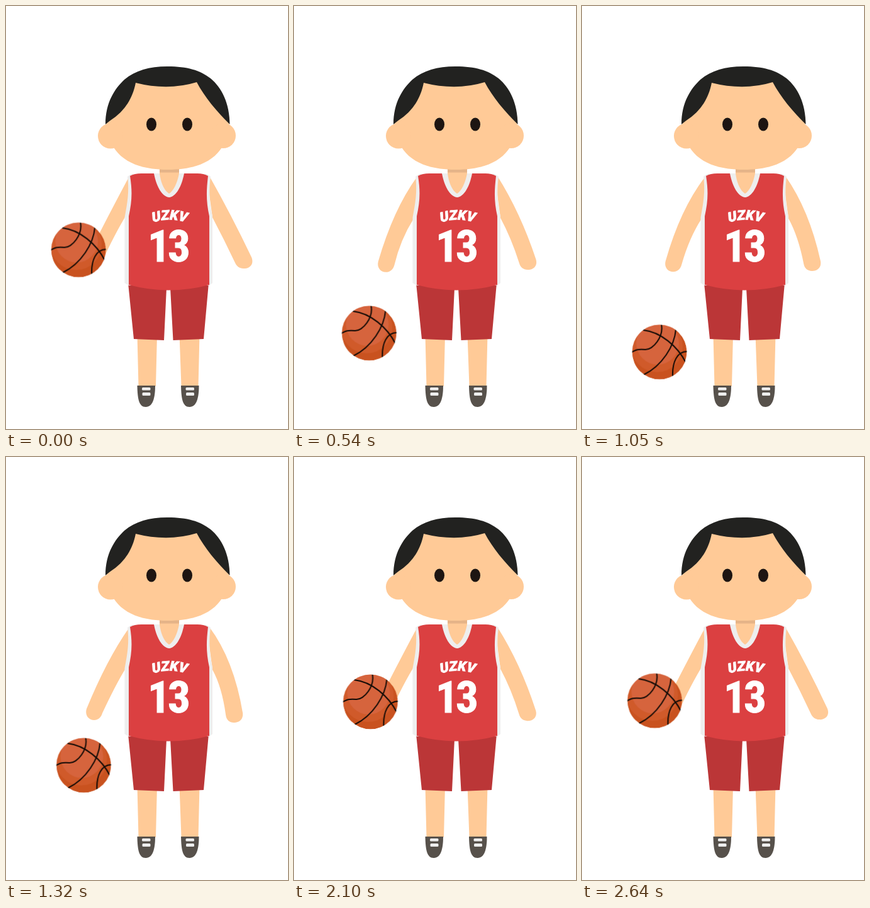
Animation, 448 px wide and 672 px high, one loop 2.67 s. Source, as an HTML page:

```html
<!DOCTYPE html>
<html lang="en">
<head>
<meta charset="utf-8">
<title>Dribbling player</title>
<style>
  html, body { margin: 0; width: 100%; height: 100%; overflow: hidden; background: #fff; }
  svg { display: block; width: 448px; height: 672px; }
  .skin { fill: #ffca97; }
  .trim { fill: #eee; }
  .shirt { fill: #db4041; }
  .shorts { fill: #bb3637; }
  .dark { fill: #1d1512; }
  .print { fill: #fff; stroke: #fff; text-anchor: middle; }
  .team { font: italic 900 21.5px Roboto, "Liberation Sans", sans-serif; stroke-width: .8; }
  .number { font: 700 71px "Roboto Condensed", Roboto, "Liberation Sans", sans-serif; stroke-width: 1; }
  .seams { fill: none; stroke: #110a06; stroke-width: 2; }
  .ball, .arm { animation: 2670ms linear infinite; }
  .ball { animation-name: bounce; }
  .left { animation-name: dribble; }
  .right { animation-name: swing; }

  @keyframes bounce {
    0%, 100% { transform: translate(115.2px, 387.2px); }
    11.24% { transform: translate(117.5px, 461px); }
    30.34% { transform: translate(121.5px, 585.5px); }
    31.84% { transform: translate(121.8px, 593px); }
    41.57% { transform: translate(123.5px, 537px); }
    49.44% { transform: translate(123.5px, 490px); }
    64.04% { transform: translate(122.5px, 406.5px); }
    66.7% { transform: translate(122.4px, 394px); }
    78.65% { transform: translate(121.5px, 389px); }
  }
  @keyframes dribble {
    0%, 78.65%, 100% { d: path("M195 272Q163 332 129 399C126 409 132 417 141 417C147 417 151 412 153 405Q173 362 190 334L195 300Z"); }
    11.24% { d: path("M195 272Q163 322 131 402C128 412 134 420 143 420C149 420 154 416 156 410Q170 370 190 336L195 300Z"); }
    30.34% { d: path("M195 272Q152 325 137 410C135 419 141 426 149 426C156 426 161 422 163 414Q168 372 190 340L195 300Z"); }
    49.44%, 64.04% { d: path("M195 272Q160 322 128 400C125 410 131 418 140 418C146 418 151 414 153 407Q174 362 190 336L195 300Z"); }
  }
  @keyframes swing {
    0%, 100% { d: path("M323 270Q358 332 390 399C395 411 386 418 377 417C371 417 366 413 364 408Q347 372 328 336L323 300Z"); }
    50% { d: path("M323 270Q362 322 376 407C377 417 370 422 362 422C355 422 350 418 349 410Q343 365 328 338L323 300Z"); }
  }
</style>
</head>
<body>
<svg viewBox="0 0 448 672">
  <defs>
    <path id="arch" d="M227 346Q260 333 293 346"/>
    <clipPath id="round"><circle r="43.5"/></clipPath>
    <g id="shoe">
      <path fill="#57514b" d="M208.500 603H237C237 623 233 637 222 637S209 624 208.500 603Z"/>
      <rect class="trim" x="216" y="606" width="13.500" height="4.500" rx="1.500"/>
      <rect class="trim" x="216.500" y="614" width="13" height="5" rx="1.500"/>
    </g>
  </defs>

  <path class="skin" d="M208.500 522H240L238 604H210.500ZM275.500 522H307.500L305.500 604H278.500Z"/>
  <use href="#shoe"/>
  <use href="#shoe" x="69.500"/>
  <path class="shorts" d="M194 440L203 529L251 531L255 448ZM261 448L265.500 531L314 529L322 440Z"/>

  <path class="skin arm left" d="M195 272Q163 332 129 399C126 409 132 417 141 417C147 417 151 412 153 405Q173 362 190 334L195 300Z"/>
  <path class="skin arm right" d="M323 270Q358 332 390 399C395 411 386 418 377 417C371 417 366 413 364 408Q347 372 328 336L323 300Z"/>

  <path class="trim" d="M193 271L199 267H319L325 271C322 295 323 312 328 334V440L323 444H195L188.500 440V336C193 312 196 295 193 271Z"/>
  <path class="shirt" d="M197 270Q204 266 215 266H304Q314 266 321 270C318 295 318 311 323 334V443Q259 460 195 443V334C200 311 201 295 197 270Z"/>
  <path class="trim" d="M235 266C239 287 248 303 259 304C270 303 279 287 283 266Z"/>
  <path class="skin" d="M244 255H275V266C272 282 266 294 259 298C252 294 246 282 244 266Z"/>
  <rect x="244" y="257" width="31" height="7.500" fill="#e5b488"/>

  <path class="skin" d="M159 177C159 232 192 260 257 260S355 232 355 177L303 110H206Z"/>
  <circle class="skin" cx="166" cy="206.500" r="20"/>
  <circle class="skin" cx="345" cy="206" r="20"/>
  <path fill="#222220" d="M158 188C158 153 173 131 188 117C206 102 228 96 257 96C288 96 308 102 325 115C343 130 355 154 355.500 188C335 168 315 144 303 121Q257 135 206 122C201 148 188 165 174 176Q165 182 158 188Z"/>
  <ellipse class="dark" cx="231" cy="188" rx="8" ry="10.500"/>
  <ellipse class="dark" cx="288" cy="188" rx="8" ry="10.500"/>

  <text class="print team"><textPath href="#arch" startOffset="50%">UZKV</textPath></text>
  <text class="print number" x="243" y="406">1</text>
  <text class="print number" x="275" y="406">3</text>

  <g class="ball">
    <g clip-path="url(#round)">
      <circle r="43.500" fill="#c9521f"/>
      <circle cx="-4" cy="-9" r="41" fill="#d05a2a"/>
      <circle cx="-3" cy="-14" r="34" fill="#d6643d"/>
      <path class="seams" d="M-26-35C2-32 29-9 42 17M3-44C7-25-10-3-23-4S-38-3-44 0M26-36C24-10 4 22-25 36M44-1C28-1 20 16 21 39"/>
    </g>
  </g>
</svg>
</body>
</html>
```
